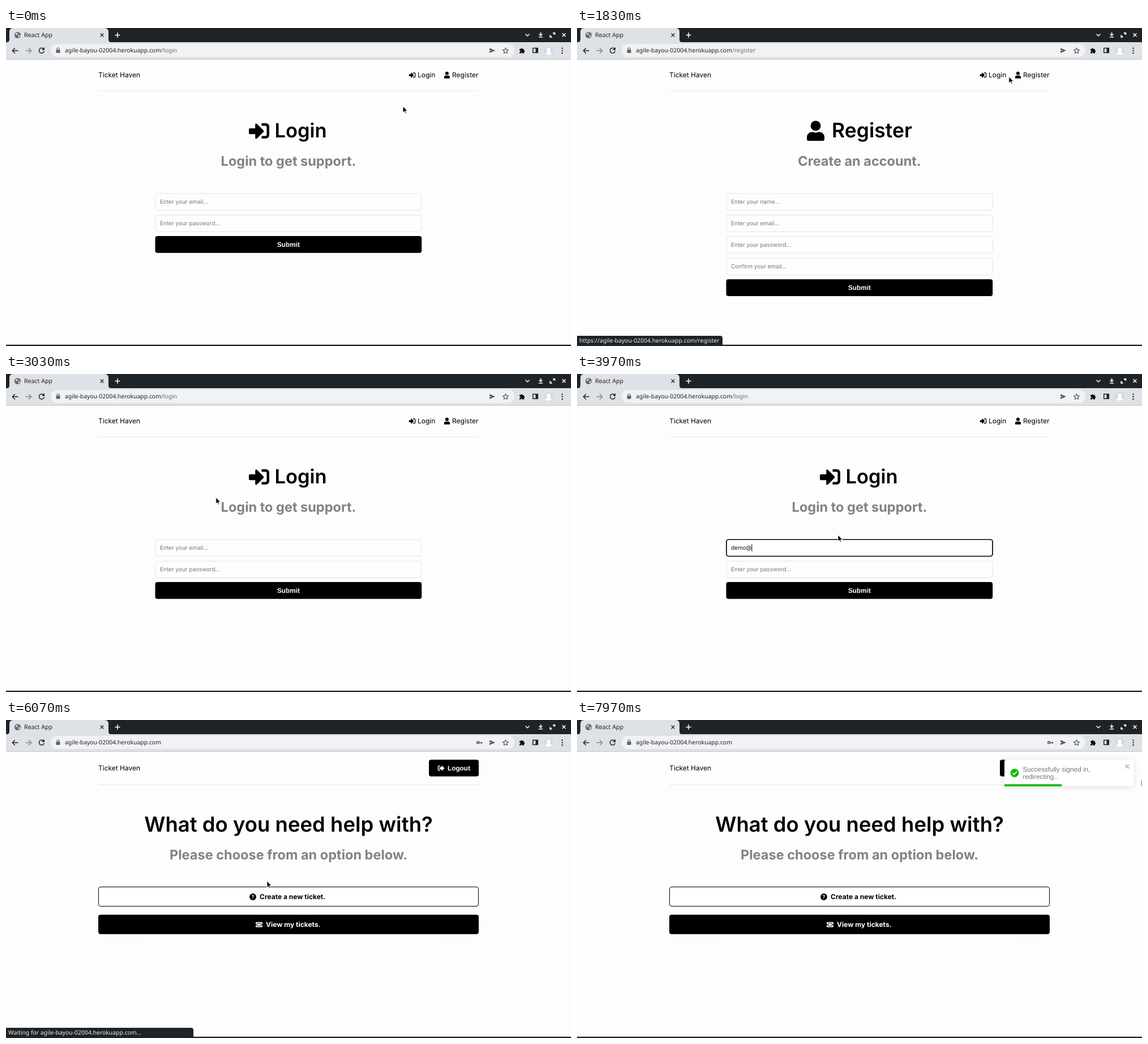
An HTML page for the animation above (8 s loop, 998x561 px).

```html
<!DOCTYPE html>
<html lang="en">
<head>
<meta charset="utf-8">
<title>React App</title>
<style>
html, body { margin: 0; width: 100%; height: 100%; overflow: hidden; background: #fdfdfd; }
svg { display: block; width: 100%; height: 100%; }
text { text-rendering: geometricPrecision; font-optical-sizing: none; white-space: pre; }
.ui { font: 10.4px "Noto Sans", sans-serif; }
.page { font: 12px Inter, sans-serif; }
.h1 { font-weight: 600; text-anchor: middle; }
.h2 { font-weight: 700; font-size: 23.5px; fill: #828282; text-anchor: middle; }
.bold { font-weight: 700; }
.hint { font-size: 10px; fill: #777; }
.typed { font-size: 10px; fill: #111; }
.btn { font: bold 11.8px "Liberation Sans", Arial, sans-serif; fill: #fff; }
.mid { text-anchor: middle; }
.field { fill: #fdfdfd; stroke: #e4e4e4; }
.line { fill: none; stroke-linecap: round; stroke-linejoin: round; }
#toast { filter: drop-shadow(0 1px 4px rgba(0, 0, 0, .13)); }
#toast text { font: 11.75px "Liberation Sans", Arial, sans-serif; fill: #757575; }
</style>
</head>
<body>
<svg viewBox="0 0 998 561" preserveAspectRatio="none">
  <defs>
    <symbol id="signin" viewBox="0 0 512 512"><path d="M416 448h-84c-6.600-12-5.400-12-12v-40c0-6.600 5.400-12 12-12h84c17.700 0 32-14.300 32-32V160c0-17.700-14.300-32-32-32h-84c-6.600 0-12-5.400-12-12V76c0-6.600 5.400-12 12-12h84c53 0 96 43 96 96v192c0 53-43 96-96 96z" style="d:path('M416 448H332Q320 448 320 436V396Q320 384 332 384H416Q448 384 448 352V160Q448 128 416 128H332Q320 128 320 116V76Q320 64 332 64H416Q512 64 512 160V352Q512 448 416 448Z')"/><path d="M369 247 201 79c-15-15-41-4-41 17v96H24q-24 0-24 24v96q0 24 24 24h136v96c0 21 26 32 41 17l168-168q14-17 0-34z"/></symbol>
    <symbol id="signout" viewBox="0 0 512 512"><path d="M497 273 329 441c-15 15-41 4-41-17v-96H152q-24 0-24-24v-96q0-24 24-24h136V88c0-21 26-32 41-17l168 168q14 17 0 34z"/><path d="M192 436v-40q0-12-12-12H96q-32 0-32-32V160q0-32 32-32h84q12 0 12-12V76q0-12-12-12H96Q0 64 0 160v192q0 96 96 96h84q12 0 12-12z"/></symbol>
    <symbol id="user" viewBox="0 0 448 512"><circle cx="224" cy="128" r="128"/><path d="M314 288h-17q-73 32-146 0h-17C60 288 0 348 0 422v42q0 48 48 48h352q48 0 48-48v-42c0-74-60-134-134-134z"/></symbol>
  </defs>

  <rect width="998" height="561" fill="#fdfdfd"/>

  <g class="page">
    <g id="guest">
      <text x="163" y="87.300">Ticket Haven</text>
      <use href="#signin" x="711.500" y="77" width="12" height="12"/>
      <text x="727" y="87.300">Login</text>
      <use href="#user" x="773.700" y="77" width="10.500" height="12"/>
      <text x="788" y="87.300">Register</text>
      <path d="M163 110.500H835" stroke="#e8e8f0"/>
    </g>

    <g id="login">
      <use href="#signin" x="429" y="163.500" width="36" height="36"/>
      <text class="h1" x="520.500" y="193.300" font-size="34.500">Login</text>
      <text class="h2" x="499" y="242.700">Login to get support.</text>
      <rect class="field" x="264" y="292" width="470" height="29.500" rx="4" id="emailBox"/>
      <text class="hint" x="272" y="310" id="emailHint">Enter your email...</text>
      <text class="typed" x="272" y="310" id="email"></text>
      <rect class="field" x="264" y="330" width="470" height="29.500" rx="4" id="passBox"/>
      <text class="hint" x="272" y="348" id="passHint">Enter your password...</text>
      <g id="dots"></g>
      <path id="caret" d="M0 0V13" stroke="#111"/>
      <rect x="263.500" y="367" width="470.700" height="29.700" rx="4"/>
      <text class="btn mid" x="499" y="385.700">Submit</text>
    </g>

    <g id="register">
      <use href="#user" x="406" y="163.500" width="31.200" height="35.700"/>
      <text class="h1" x="521" y="193.300" font-size="35.500">Register</text>
      <text class="h2" x="499" y="242.700">Create an account.</text>
      <g id="regFields"></g>
      <rect x="263.500" y="443.300" width="470.700" height="29.700" rx="4"/>
      <text class="btn mid" x="499" y="461.900">Submit</text>
    </g>

    <g id="home">
      <text x="163" y="89.300">Ticket Haven</text>
      <rect x="747" y="70" width="88" height="29.500" rx="4"/>
      <use href="#signout" x="762.500" y="79" width="12" height="12" fill="#fff"/>
      <text class="btn" x="780" y="88.700">Logout</text>
      <path d="M163 114.500H835" stroke="#e4e4e4"/>
      <text class="h1" x="499" y="196.700" font-size="36.500">What do you need help with?</text>
      <text class="h2" x="499" y="246.300">Please choose from an option below.</text>
      <rect x="163.500" y="294.500" width="671" height="34" rx="3.500" fill="#fff" stroke="#000"/>
      <circle cx="436" cy="312" r="5.900"/>
      <text class="bold mid" x="436" y="315.400" font-size="9" fill="#fff">?</text>
      <text class="bold" x="448" y="315.900">Create a new ticket.</text>
      <rect x="163" y="343.500" width="672" height="34.300" rx="4"/>
      <path d="M442 356.500h10q1 0 1 1v2a1.300 1.300 0 0 0 0 3v2q0 1-1 1h-10q-1 0-1-1v-2a1.300 1.300 0 0 0 0-3v-2q0-1 1-1z" fill="#fff"/>
      <rect x="443.700" y="358.700" width="6.600" height="4.600" fill="none" stroke="#000" stroke-width=".8"/>
      <text class="bold" x="459" y="364.700" fill="#fff">View my tickets.</text>
    </g>
  </g>

  <g class="ui">
    <rect width="998" height="26" fill="#1d2327"/>
    <path d="M0 25H2Q6 25 6 20V7Q6 0 13 0H174Q181 0 181 7V20Q181 25 185 25H998V55H0z" fill="#dee1e5"/>
    <path d="M0 55.500H998" stroke="#c3c6c9"/>
    <circle cx="20.500" cy="12.500" r="5.500" fill="#5f6368"/>
    <path d="M17 10q3-3 5 0l-2 2-3 1zM21 13l4-1q0 4-3 5z" fill="#c9ccd0"/>
    <text x="32" y="16.300" font-size="10.600" fill="#202124">React App</text>
    <path class="line" d="M167 10l5 5m0-5l-5 5" stroke="#202124" stroke-width="1.300"/>
    <path class="line" d="M193 12.500h8m-4-4v8M918 11l3 3 3-3M944.500 8v5m-2.500-2l2.500 2.500 2.500-2.500M941.500 16h6M967 10.500l2-2m-2.500 0h3v3M963 14l-2 2m0-3v3.200h3M983 9.700l5 5m0-5l-5 5" stroke="#fff" stroke-width="1.500"/>

    <rect x="79" y="28" width="819" height="23" rx="11.500" fill="#f0f2f4"/>
    <g class="line" stroke-width="1.500">
      <path d="M21 40H11.500m4-4.200l-4.200 4.200 4.200 4.200" stroke="#202124"/>
      <path d="M35 40h9.500m-4-4.200l4.200 4.200-4.200 4.200" stroke="#85898d"/>
      <path d="M66.500 37a4.500 4.500 0 1 0 .7 4.300M67.300 35v3.200h-3.200" stroke="#202124"/>
      <path d="M90 38.500v-1.500a2 2 0 0 1 4 0v1.500" stroke="#5f6368" stroke-width="1.200"/>
      <path d="M882.500 35l1.400 3.300 3.600.3-2.700 2.400.8 3.500-3.100-1.900-3.100 1.900.8-3.500-2.700-2.400 3.600-.3z" stroke="#4a4e52" stroke-width="1.100"/>
      <rect x="930.700" y="35.500" width="8.600" height="8" stroke="#202124"/>
    </g>
    <rect x="88.500" y="38.300" width="7" height="5.700" rx="1" fill="#5f6368"/>
    <text x="104" y="43.300" fill="#202124">agile-bayou-02004.herokuapp.com<tspan id="path" fill="#6b6f73"></tspan></text>
    <g id="key"><circle cx="833.700" cy="39.700" r="2" fill="none" stroke="#4a4e52" stroke-width="1.500"/><path d="M836 39.700h5.300m-1.300 0v2.300" stroke="#4a4e52" stroke-width="1.500" fill="none"/></g>
    <path d="M854 35.500l10 4.300-10 4.300v-3.300l5-1-5-1z" fill="#4a4e52"/>
    <path d="M907 37h2.300a1.500 1.500 0 0 1 3 0h2.500v2.500a1.500 1.500 0 0 1 0 3V45h-2.500a1.500 1.500 0 0 0-3 0H907v-2.500a1.500 1.500 0 0 0 0-3z" fill="#111"/>
    <rect x="935.500" y="35" width="4.500" height="9" fill="#202124"/>
    <circle cx="958.500" cy="40" r="8" fill="#cfdae6"/>
    <path d="M953 45.500q0-3 3.500-3.500-1.500-1.500-1.500-4a3.500 3.500 0 0 1 7 0q0 2.500-1.500 4 3.500.5 3.500 3.500-5 4-11 0z" fill="#fff"/>
    <g fill="#202124"><circle cx="982.500" cy="35.800" r="1.200"/><circle cx="982.500" cy="40" r="1.200"/><circle cx="982.500" cy="44.200" r="1.200"/></g>

    <g id="status">
      <path id="bubble" fill="#1d2327"/>
      <text id="statusText" x="4" y="555.300" fill="#f2f2f2"></text>
    </g>
    <rect y="558.700" width="998" height="2.300" fill="#1d2327"/>
  </g>

  <g id="toast">
    <rect x="755" y="70" width="228.500" height="47" rx="3" fill="#fff"/>
    <circle cx="773" cy="93.500" r="7.400" fill="#07bc0c"/>
    <path class="line" d="M769.700 93.700l2.500 2.500 4.300-5" stroke="#fff" stroke-width="1.600"/>
    <text x="787.500" y="90.600">Successfully signed in,</text>
    <text x="787.500" y="104">redirecting..</text>
    <path class="line" d="M968.700 79l6 6m0-6l-6 6" stroke="#aaa" stroke-width="1.500"/>
    <rect id="bar" x="755" y="113.300" height="3.700" fill="#07bc0c"/>
  </g>

  <g id="cursor" stroke="#fff" stroke-width=".9" stroke-linejoin="round">
    <path id="arrow" d="M0 0V11.300L2.600 9 4.400 12.800 6 12 4.400 8.300H8z"/>
    <path id="hand" d="M1 0C2 0 2.200.8 2.500 2L3.400 4.700 7 5.300Q8.200 6 7.700 8.500L7 11H2.300L-1 7C-1.400 5.600 0 5.300 1 6.400L.1 1.300Q0 0 1 0Z"/>
    <path id="beam" d="M-2-5.500h4M0-5.500v11M-2 5.500h4" stroke="#222"/>
  </g>
</svg>
<script>
const LOOP = 8000, HOST = "https://agile-bayou-02004.herokuapp.com";
const $ = id => document.getElementById(id);
const show = (id, on) => $(id).setAttribute("display", on ? "inline" : "none");
const set = (id, attrs) => { for (const k in attrs) $(id).setAttribute(k, attrs[k]); };
const clamp = v => Math.min(1, Math.max(0, v));
const smooth = p => p * p * (3 - 2 * p);
const easeOut = p => 1 - (1 - p) ** 3;

// Value of the last step whose start time has passed
const at = (steps, t) => steps.reduce((v, s) => t >= s[0] ? s[1] : v, null);

const pages = [[0, "login"], [1450, "register"], [2600, "login"], [5750, "home"]];
const paths = { login: "/login", register: "/register", home: "" };
const notes = [
  [0, null], [500, [HOST, 331]], [1230, [HOST + "/register", 257]],
  [1960, [HOST + "/login", 242.5]], [2480, [HOST, 242.5]], [3000, null],
  [5400, ["Waiting for agile-bayou-02004.herokuapp.com...", 331]], [6140, null]
];
const moves = [
  [0, 701, 138], [80, 701, 138], [500, 215, 88], [720, 215, 88], [1120, 818, 94],
  [1300, 818, 94], [1450, 810, 88], [1700, 810, 88], [1900, 745, 85], [2030, 745, 85],
  [2340, 251, 80], [2450, 222, 84], [2780, 222, 84], [3220, 468, 305], [3450, 468, 305],
  [3700, 461, 284], [6300, 461, 284], [6900, 882, 137], [7000, 882, 137],
  [7380, 900, 230], [7780, 935, 172], [7970, 997, 106], [8000, 998, 105]
];
const EMAIL = "demo@demo.test";

["name", "email", "password"].map(s => `Enter your ${s}...`).concat("Confirm your email...").forEach((label, i) => {
  $("regFields").innerHTML += `<rect class="field" x="264" y="${292 + 38 * i}" width="470" height="29.5" rx="4"/>
    <text class="hint" x="272" y="${310 + 38 * i}">${label}</text>`;
});

function pointer(t) {
  const i = Math.max(1, moves.findIndex(m => m[0] > t));
  const [a, b] = [moves[i - 1], moves[i]];
  const p = smooth(clamp((t - a[0]) / (b[0] - a[0])));
  return [a[1] + (b[1] - a[1]) * p, a[2] + (b[2] - a[2]) * p];
}

function drawCursor(t, page) {
  const [x, y] = pointer(t);
  const inside = (l, r, top, bottom) => x > l && x < r && y > top && y < bottom;
  const link = page !== "home" && [[163, 240], [711, 758], [774, 835]].some(([l, r]) => inside(l, r, 74, 99));
  const field = page === "login" && inside(264, 734, 292, 321);
  set("cursor", { transform: `translate(${x} ${y})` });
  show("hand", link);
  show("beam", field);
  show("arrow", !link && !field);
}

function drawForm(t) {
  const typed = Math.round(clamp((t - 3480) / 1260) * EMAIL.length);
  const dots = Math.floor(clamp((t - 4700) / 430) * 6);
  const onEmail = t >= 3300 && t < 4780, onPass = t >= 4780;
  $("email").textContent = EMAIL.slice(0, typed);
  show("emailHint", !typed);
  show("passHint", !dots);
  $("dots").innerHTML = Array.from({ length: dots }, (_, i) => `<circle cx="${274.5 + 5.5 * i}" cy="344.5" r="1.9"/>`).join("");
  for (const [id, on] of [["emailBox", onEmail], ["passBox", onPass]])
    $(id).style.cssText = on ? "stroke:#000;stroke-width:1.7;fill:#fff" : "";
  show("caret", onEmail || onPass);
  const x = onPass ? 272.5 + 5.5 * dots : 272.5 + (typed ? $("email").getComputedTextLength() : 0);
  set("caret", { transform: `translate(${x} ${onPass ? 338 : 300})` });
}

function drawStatus(t) {
  const note = at(notes, t);
  show("status", note);
  if (!note) return;
  const [text, w] = note;
  $("statusText").textContent = text;
  set("bubble", { d: `M0 543H${w - 4}Q${w} 543 ${w} 547V559H0z` });
}

function drawToast(t) {
  const p = (t - 6140) / 640;
  show("toast", p > 0);
  if (p <= 0) return;
  const keys = [[0, 2229], [.6, -18.6], [.75, 7.4], [.9, -3.7], [1, 0]];
  const q = clamp(p), i = Math.max(1, keys.findIndex(k => k[0] >= q));
  const [a, b] = [keys[i - 1], keys[i]];
  const x = a[1] + (b[1] - a[1]) * easeOut((q - a[0]) / (b[0] - a[0]));
  set("toast", { transform: `translate(${x} 0)`, opacity: clamp(q / .6) });
  set("bar", { width: 228.5 * (1 - clamp((t - 6780) / 2140)) });
}

function render(t) {
  const page = at(pages, t);
  for (const id of ["login", "register", "home"]) show(id, id === page);
  show("guest", page !== "home");
  show("key", t >= 4750);
  $("path").textContent = paths[page];
  if (page === "login") drawForm(t);
  drawStatus(t);
  drawToast(t);
  drawCursor(t, page);
}

const start = performance.now();
function tick() {
  render((performance.now() - start) % LOOP);
  requestAnimationFrame(tick);
}
tick();
</script>
</body>
</html>
```
